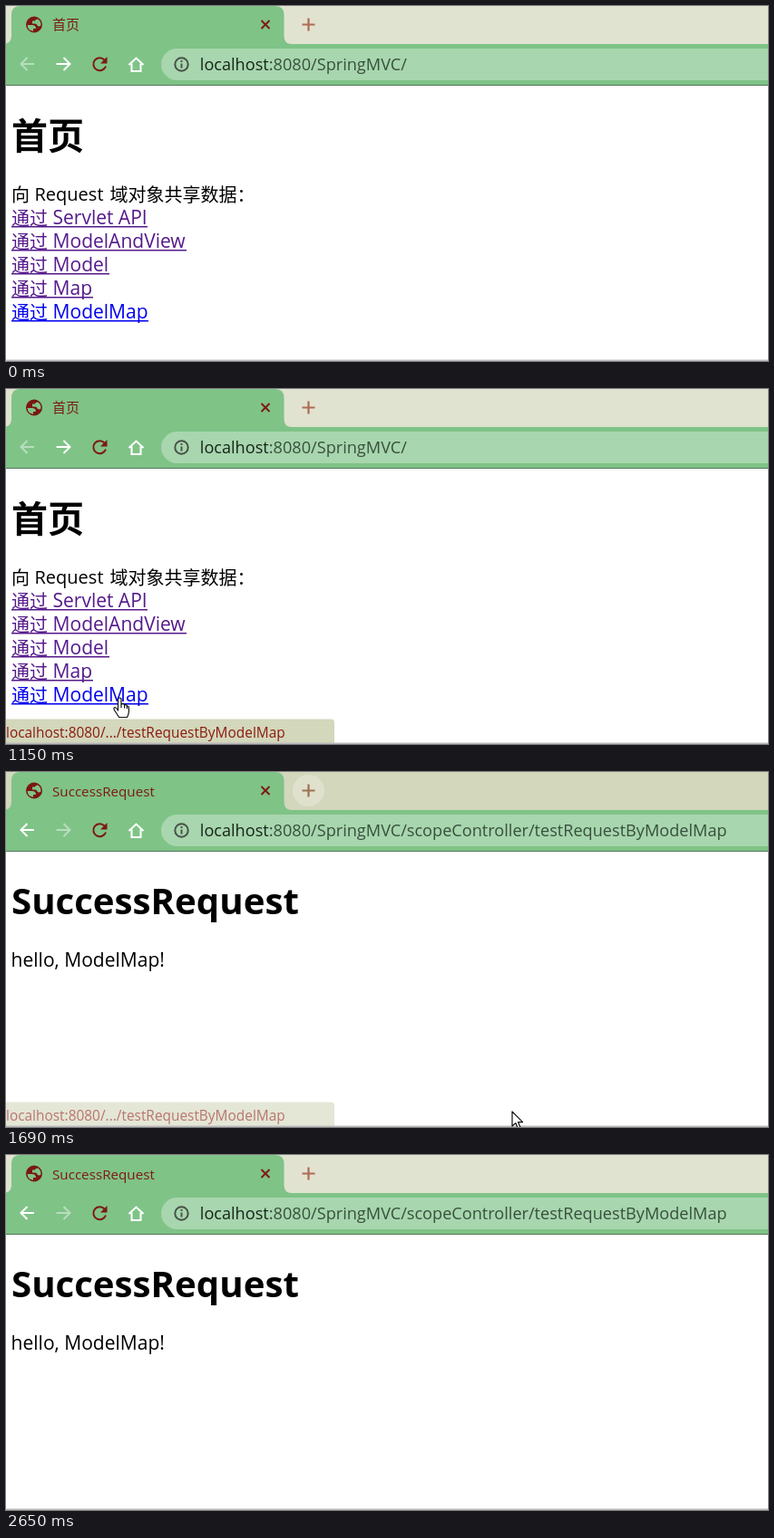
These frames come from a looping animation (840 px wide and 392 px high, 2.72 s). An HTML page:

```html
<!DOCTYPE html>
<html lang="zh">
<head>
<meta charset="utf-8">
<title>首页</title>
<style>
html, body { margin: 0; width: 100%; height: 100%; overflow: hidden; background: #fff; }
svg { display: block; width: 100%; height: 100%; font-family: "Open Sans", "Noto Sans CJK SC", "Noto Sans CJK", sans-serif; }
.zh { font-family: "Noto Sans CJK SC", "Noto Sans CJK", sans-serif; font-size: 20px; }
.body { font-size: 21px; }
.url { font-size: 18.14px; fill: #37503d; }
.url .host { fill: #17251a; }
.tab { font-size: 15.2px; fill: #7d1a12; }
.line { fill: none; stroke-width: 2; }
.visited { fill: #551a8b; }
.link { fill: #00e; }

/* one shared clock, hard cuts */
.home, .done, .busy, .idle, .strip, .halo, .plus, .press, .dot, .status,
.arrow, .hand, .spin { animation: 2720ms step-end infinite; }
.home { animation-name: home; }
.done { animation-name: done; }
.busy { animation-name: busy; }
.idle { animation-name: idle; }
.strip { animation-name: strip; }
.halo { animation-name: halo; }
.plus { animation-name: plus; }
.press { animation-name: press; }
.dot { animation-name: dot; }
.status { animation-name: status; }
.arrow { animation-name: arrow; }
.hand { animation-name: hand; }
.spin { animation-name: spin; transform-origin: 31px 20.5px; }

@keyframes home { 0% { opacity: 1 } 50%, 100% { opacity: 0 } }
@keyframes done { 0% { opacity: 0 } 50%, 100% { opacity: 1 } }
@keyframes busy { 0% { opacity: 0 } 50% { opacity: 1 } 59.55%, 100% { opacity: 0 } }
@keyframes idle { 0% { opacity: 1 } 50% { opacity: 0 } 59.55%, 100% { opacity: 1 } }
@keyframes strip { 0% { fill: #e0e3d0 } 42.64% { fill: #d3d7bb } 97.42%, 100% { fill: #e0e3d0 } }
@keyframes halo { 0% { fill: #e2e2d0 } 42.64% { fill: #dfe1cd } 97.42%, 100% { fill: #e2e2d0 } }
@keyframes plus { 0% { stroke: #ae6a54 } 42.64% { stroke: #9c7152 } 97.42%, 100% { stroke: #ae6a54 } }
@keyframes press { 0% { fill: #00e } 42.64% { fill: #f00 } 47.42%, 100% { fill: #00e } }
@keyframes dot { 0% { opacity: 0 } 42.64% { opacity: 1 } 47.42%, 100% { opacity: 0 } }
@keyframes status {
  0% { opacity: 0 } 30.14% { opacity: .8 } 32.72% { opacity: 1 }
  62.13% { opacity: .6 } 64.7%, 100% { opacity: 0 }
}
@keyframes hand { 0% { opacity: 0 } 22.79% { opacity: 1 } 50%, 100% { opacity: 0 } }
@keyframes arrow {
  0% { opacity: 0; transform: translate(414px, 384px) }
  7.35% { opacity: 1; transform: translate(414px, 384px) }
  9.92% { opacity: 1; transform: translate(362px, 376px) }
  12.5% { opacity: 1; transform: translate(300px, 366px) }
  15.07% { opacity: 1; transform: translate(236px, 356px) }
  17.64% { opacity: 1; transform: translate(182px, 348px) }
  20.22% { opacity: 1; transform: translate(142px, 342px) }
  22.79% { opacity: 0; transform: translate(125px, 341px) }
  50% { opacity: 1; transform: translate(132px, 343px) }
  52.57% { opacity: 1; transform: translate(198px, 356px) }
  54.77% { opacity: 1; transform: translate(277px, 368px) }
  56.98% { opacity: 1; transform: translate(364px, 372px) }
  59.55% { opacity: 1; transform: translate(462px, 374px) }
  62.13% { opacity: 1; transform: translate(558px, 375px) }
  64.7% { opacity: 1; transform: translate(646px, 375px) }
  67.27% { opacity: .35; transform: translate(722.5px, 375.5px) }
  69.85% { opacity: 1; transform: translate(756px, 379px) }
  72.42% { opacity: 1; transform: translate(780px, 382px) }
  75% { opacity: 1; transform: translate(797px, 385px) }
  77.57% { opacity: 1; transform: translate(806px, 387px) }
  80.14% { opacity: 1; transform: translate(809px, 389px) }
  85.29%, 100% { opacity: 0; transform: translate(810px, 390px) }
}
@keyframes spin {
  0% { transform: rotate(-100deg) } 52.57% { transform: rotate(-50deg) }
  54.77% { transform: rotate(0deg) } 56.98%, 100% { transform: rotate(50deg) }
}
</style>
</head>
<body>
<svg viewBox="0 0 840 392">
  <defs>
    <path id="left" class="line" d="M31 64H16.5M23.5 57L16.5 64L23.5 71"/>
    <path id="right" class="line" d="M55.5 64H70M63.5 57L70.5 64L63.5 71"/>
  </defs>
  <rect width="840" height="392" fill="#fff"/>

  <!-- tab strip -->
  <rect class="strip" width="840" height="42" fill="#e0e3d0"/>
  <path d="M0 88V41.5Q6 40 6 33V10Q6 0 15 0H297Q306.5 0 306.5 10V33Q306.5 42 315 42H840V88Z" fill="#7fc387"/>
  <rect y="87" width="840" height="1" fill="#56765c"/>
  <path d="M281.5 16L290.5 25M290.5 16L281.5 25" class="line" stroke="#7d1a12"/>
  <circle class="halo" cx="333.5" cy="20.5" r="17.5" fill="#e2e2d0"/>
  <path class="plus" d="M326.5 20.5H340.5M333.5 13.5V27.5" stroke="#ae6a54" stroke-width="2.2"/>
  <path class="idle" fill="#7a1712" fill-rule="evenodd" d="M22 20.5A9 9 0 1 1 40 20.5A9 9 0 1 1 22 20.5ZM23.6 21A7.4 7.4 0 0 0 30 27.8V25H33Q33 21 28.5 21ZM35.2 14.4Q32 14.6 32 16.5H29V19.5H32Q34 19.5 34.5 21.5Q36 23.5 38.3 21.8A7.4 7.4 0 0 0 35.2 14.4Z"/>
  <g class="busy" opacity="0">
    <path class="spin" d="M32 11.5Q37.5 12 39.5 17.5" fill="none" stroke="#4b93a6" stroke-width="2"/>
  </g>

  <!-- toolbar -->
  <g stroke="#fff">
    <g class="home"><use href="#left" opacity=".45"/><use href="#right"/></g>
    <g class="done" opacity="0"><use href="#left"/><use href="#right" opacity=".45"/></g>
    <path class="line" d="M135.5 65L143.5 57.5L151.5 65M138.5 63.5V72H148.5V63.5"/>
  </g>
  <g class="idle" fill="#7d1a12">
    <path class="line" stroke="#7d1a12" d="M108.5 59.5A7 7 0 1 0 110 66.5"/>
    <path d="M111.5 56V63.5H104Z"/>
  </g>
  <path class="busy line" opacity="0" stroke="#7d1a12" d="M96 57L111 72M111 57L96 72"/>
  <rect x="171" y="47" width="700" height="35" rx="17.5" fill="#a8d6ae"/>
  <circle cx="193.5" cy="64.5" r="7.2" class="line" stroke="#475148" stroke-width="1.7"/>
  <path d="M193.5 60V62M193.5 63.5V68.5" stroke="#475148" stroke-width="1.9"/>

  <!-- first page -->
  <g class="home">
    <text class="zh" x="51" y="26" style="font-size:15px" fill="#7d1a12">首页</text>
    <text class="url" x="213.8" y="71"><tspan class="host">localhost</tspan>:8080/SpringMVC/</text>
    <text class="zh" x="6" y="158" style="font-size:40px" font-weight="700">首页</text>
    <g class="body">
      <text class="zh" x="6" y="215.5">向</text>
      <text x="31.5" y="215" font-size="20">Request</text>
      <text class="zh" x="114.5" y="215.5">域对象共享数据：</text>
      <g class="visited">
        <text class="zh" x="6" y="241.5">通过</text><text x="51.5" y="241">Servlet API</text>
        <rect x="6" y="243" width="150" height="1.5"/>
        <text class="zh" x="6" y="267.5">通过</text><text x="51.5" y="267">ModelAndView</text>
        <rect x="6" y="269" width="193" height="1.5"/>
        <text class="zh" x="6" y="293.5">通过</text><text x="51.5" y="293">Model</text>
        <rect x="6" y="295" width="108" height="1.5"/>
        <text class="zh" x="6" y="319.5">通过</text><text x="51.5" y="319">Map</text>
        <rect x="6" y="321" width="90" height="1.5"/>
      </g>
      <g class="link press">
        <text class="zh" x="6" y="345.5">通过</text><text x="51.5" y="345">ModelMap</text>
        <rect x="6" y="347" width="151" height="1.5"/>
      </g>
    </g>
  </g>

  <!-- second page -->
  <g class="done" opacity="0">
    <text class="tab" x="51" y="26.5">SuccessRequest</text>
    <text class="url" x="213.8" y="71"><tspan class="host">localhost</tspan>:8080/SpringMVC/scopeController/testRequestByModelMap</text>
    <text x="6" y="157" font-size="40.2" font-weight="700">SuccessRequest</text>
    <text class="body" x="5.6" y="215">hello, ModelMap!</text>
  </g>

  <g class="status" opacity="0">
    <path d="M0 364.5H358Q362 364.5 362 368.5V391H0Z" fill="#d3d7bb"/>
    <text x="0" y="385" font-size="15.42" fill="#8b1a10">localhost:8080/.../testRequestByModelMap</text>
  </g>
  <rect y="390.5" width="840" height="1.5" fill="#bbb"/>

  <!-- pointer -->
  <circle class="dot" opacity="0" cx="125.5" cy="337.5" r="14" fill="#ffef3a" style="mix-blend-mode:multiply"/>
  <g fill="#fff" stroke="#111" stroke-width="1.2" stroke-linejoin="round">
    <path class="hand" opacity="0" d="M123.5 355V343Q123.5 341 125.3 341T127 343V348.5Q127.5 347.5 129 347.7T130.6 349.3Q131 348.5 132.3 348.8T133.4 350.4Q135.4 349.8 135.4 352V356Q135.4 359 133.6 362.5H124.6Q122 358.5 119.4 354.5Q118.2 352 120 351.5Q121.5 351.5 123.5 355ZM127 348.5V352M130.6 349.5V352.5M133.4 350.5V353"/>
    <path class="arrow" opacity="0" d="M0 0V16L3.8 12.6L6.4 18.6L9 17.5L6.5 11.6H11.6Z"/>
  </g>
</svg>
</body>
</html>
```
